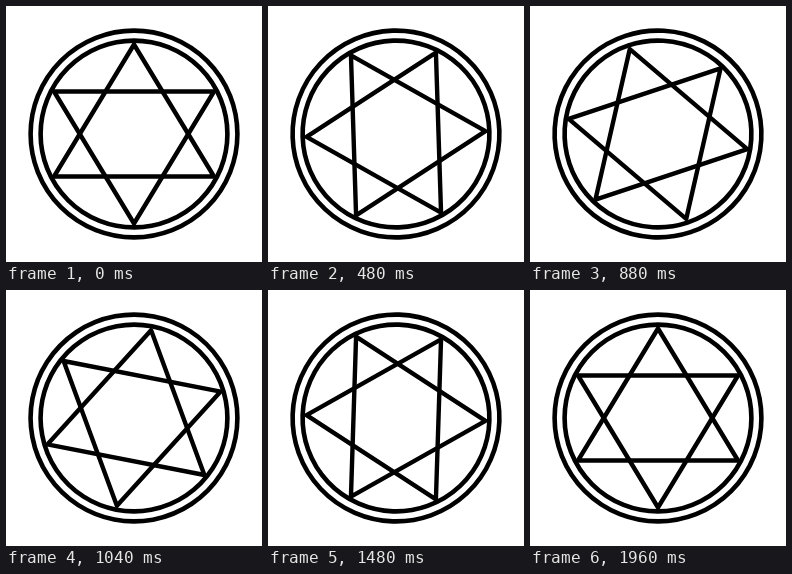
Recreate the animation shown at these times as an HTML page with a canvas. Size 256 by 256 pixels, loop 2000 ms.

```html
<!DOCTYPE html>
<html lang="en">
<head>
<meta charset="utf-8">
<title>Turning star</title>
<style>
  html, body { margin: 0; width: 100%; height: 100%; overflow: hidden; background: #fff; }
  canvas { display: block; width: 256px; height: 256px; }
</style>
</head>
<body>
<canvas id="stage" width="256" height="256"></canvas>
<script>
  const ctx = document.getElementById('stage').getContext('2d');
  const STEP = 40, STEPS = 50;

  function ring(radius, width) {
    ctx.lineWidth = width;
    ctx.beginPath();
    ctx.arc(0, 0, radius, 0, Math.PI * 2);
    ctx.stroke();
  }

  // dir = 1 points up, dir = -1 points down
  function triangle(dir) {
    ctx.lineWidth = 4.4;
    ctx.beginPath();
    ctx.moveTo(0, -89.5 * dir);
    ctx.lineTo(80, 42.5 * dir);
    ctx.lineTo(-80, 42.5 * dir);
    ctx.closePath();
    ctx.stroke();
  }

  function draw(ms) {
    const step = Math.floor(ms / STEP) % STEPS;
    ctx.setTransform(1, 0, 0, 1, 0, 0);
    ctx.fillStyle = '#fff';
    ctx.fillRect(0, 0, 256, 256);
    ctx.translate(128, 128);
    // the last step completes the turn
    ctx.rotate(step / (STEPS - 1) * Math.PI * 2);
    ctx.strokeStyle = '#000';
    ctx.lineJoin = 'round';
    ring(103.4, 4.6);
    ring(93.4, 4.6);
    triangle(1);
    triangle(-1);
  }

  const start = performance.now();
  function tick() {
    draw(performance.now() - start);
    requestAnimationFrame(tick);
  }
  draw(0);
  requestAnimationFrame(tick);
</script>
</body>
</html>
```
